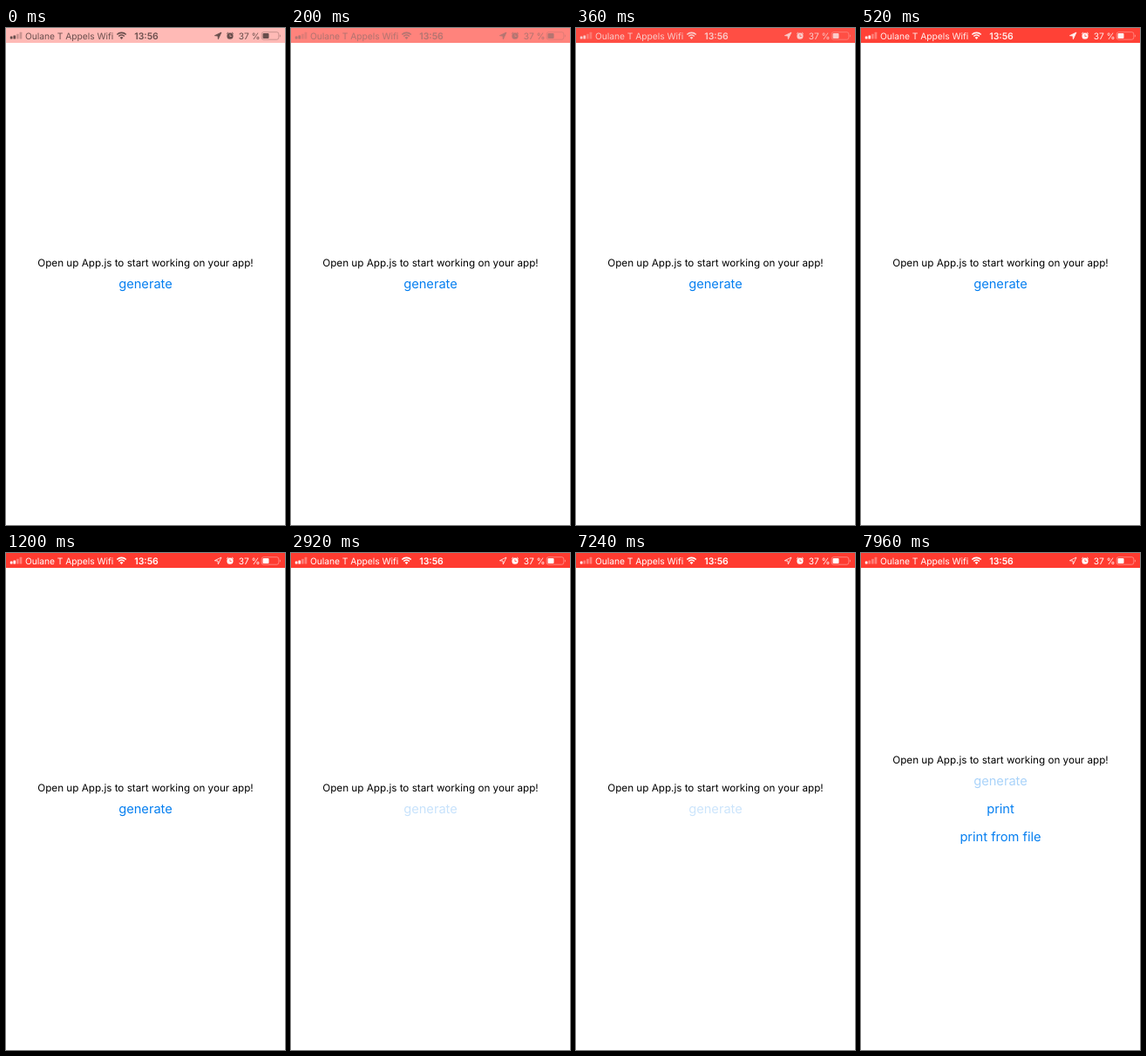
Recreate the animation shown at these times as an HTML page. Size 320 px wide and 569 px high, loop 8 s.

```html
<!DOCTYPE html>
<html lang="en">
<head>
<meta charset="utf-8">
<title>App screen</title>
<style>
  html, body { margin: 0; width: 100%; height: 100%; overflow: hidden; background: #fff; }
  svg { display: block; width: 100vw; height: 100vh; font-family: Inter, Roboto, sans-serif; text-rendering: geometricPrecision; }
  .status { font-size: 10.2px; }
  .clock { font-size: 10.5px; font-weight: 600; }
  .centered { text-anchor: middle; }
  .intro { font-size: 11.68px; }
  .button { font-size: 14.65px; fill: #067ff0; }
</style>
</head>
<body>
<svg viewBox="0 0 320 569">
  <defs>
    <g id="status" class="status" fill="currentColor" stroke="none">
      <rect x="4.8" y="9.6" width="2.7" height="3" rx=".5"/>
      <rect id="bar2" x="8.4" y="8.4" width="2.7" height="4.2" rx=".5"/>
      <rect x="12" y="6.7" width="2.7" height="5.9" rx=".5" opacity=".35"/>
      <rect x="15.6" y="4.8" width="2.7" height="7.8" rx=".5" opacity=".35"/>
      <text x="22" y="12.6">Oulane T Appels Wifi</text>
      <path d="M132.5 13L130.6 10.9A2.7 2.7 0 0 1 134.4 10.9Z"/>
      <g fill="none" stroke="currentColor" stroke-width="1.6">
        <path d="M129.2 9.5A4.7 4.7 0 0 1 135.8 9.5"/>
        <path d="M127.3 7.5A7.4 7.4 0 0 1 137.7 7.5"/>
      </g>
      <text class="clock centered" x="161" y="12.7">13:56</text>
      <path id="arrow" d="M247 5L239.4 8.7L243 9.1L243.4 12.8Z" stroke="currentColor" stroke-width=".8" stroke-linejoin="round"/>
      <path fill-rule="evenodd" d="M253.4 9.2a3.6 3.6 0 1 1 7.2 0a3.6 3.6 0 1 1 -7.2 0ZM256.6 7.2v2.5h2.1v-.7h-1.4v-1.8Z"/>
      <path d="M253.4 6.3L254.5 5.3M260.6 6.3L259.5 5.3" stroke="currentColor" stroke-width="1" stroke-linecap="round"/>
      <text x="266.7" y="12.6">37 %</text>
      <rect x="293.2" y="4.7" width="19.6" height="8.5" rx="2.2" fill="none" stroke="currentColor" stroke-width=".8" opacity=".45"/>
      <rect x="294.5" y="6" width="7" height="5.9" rx="1"/>
      <path d="M313.9 7.5a1.6 1.6 0 0 1 0 3Z" opacity=".45"/>
    </g>
  </defs>

  <rect width="320" height="569" fill="#fff"/>
  <rect id="header" width="320" height="17.06" fill="#ff3b30"/>
  <use id="dark" href="#status" color="#000"/>
  <use id="light" href="#status" color="#fff"/>

  <g id="main" class="centered">
    <text class="intro" x="160" y="272.8">Open up App.js to start working on your app!</text>
    <text id="generate" class="button" x="160" y="297.8">generate</text>
    <g id="extra" class="button">
      <text x="160" y="330">print</text>
      <text x="160" y="362">print from file</text>
    </g>
  </g>
</svg>
<script>
  const LOOP = 8000, STEP = 40, ROW = 32;
  const el = id => document.getElementById(id);
  const set = (id, name, value) => el(id).setAttribute(name, value);

  // time, header opacity, dark icons, light icons
  const fade = [
    [0, .35, .6, .02],
    [200, .63, .36, .2],
    [360, .9, .05, .72],
    [520, .97, 0, .92],
    [800, 1, 0, 1]
  ];

  // time, opacity of the pressed button
  const press = [[0, 1], [2920, .22], [3040, .2], [7920, .26], [7960, .34]];

  function mix(table, t, col) {
    const i = table.findIndex(row => row[0] > t);
    if (i < 0) return table[table.length - 1][col];
    const a = table[i - 1], b = table[i];
    return a[col] + (b[col] - a[col]) * (t - a[0]) / (b[0] - a[0]);
  }

  const hold = (table, t) => table.filter(row => row[0] <= t).pop()[1];

  function draw(now) {
    const t = Math.floor(now % LOOP / STEP) * STEP;
    const fadeTime = t < 120 ? 0 : t;
    ["header", "dark", "light"].forEach((id, i) => set(id, "opacity", mix(fade, fadeTime, i + 1)));

    set("arrow", "fill", t < 1200 ? "currentColor" : "none");
    set("bar2", "opacity", t < 4920 ? 1 : .35);
    set("generate", "opacity", hold(press, t));

    const ready = t >= 7880;
    set("main", "transform", `translate(0 ${ready ? -ROW : 0})`);
    set("extra", "visibility", ready ? "visible" : "hidden");
  }

  const start = performance.now();
  function tick() {
    draw(performance.now() - start);
    requestAnimationFrame(tick);
  }
  tick();
</script>
</body>
</html>
```
